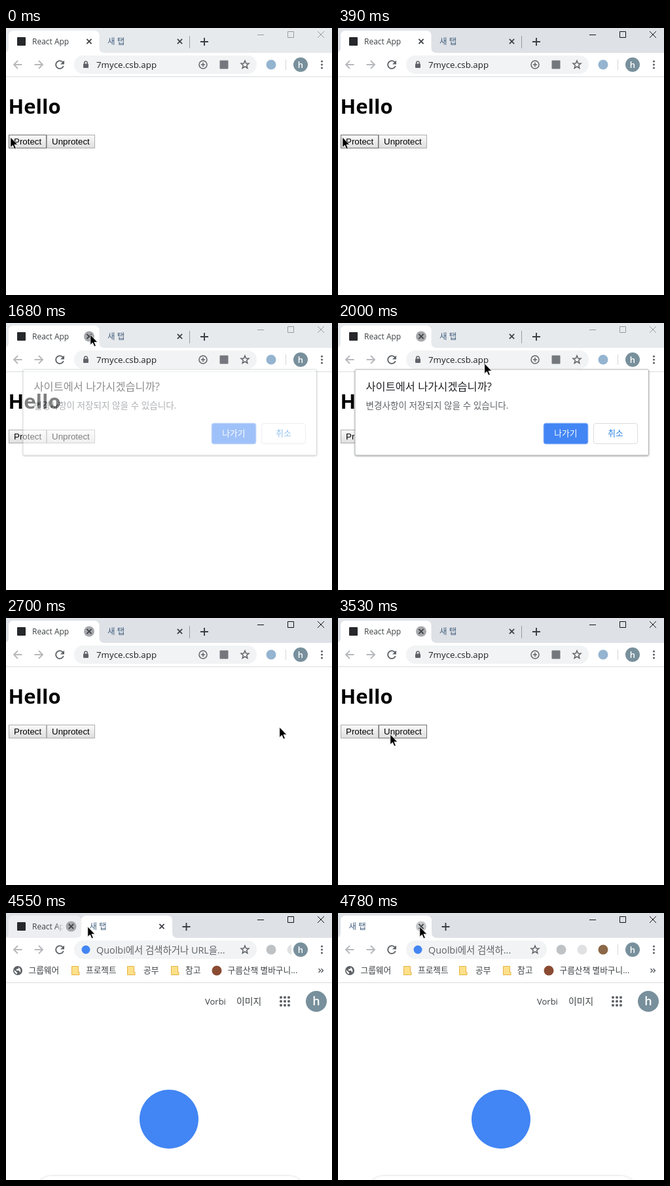
These frames come from a looping animation (498x408 px, 4870 ms). An HTML page:

```html
<!DOCTYPE html>
<html lang="ko">
<head>
<meta charset="utf-8">
<title>Leave-page prompt</title>
<style>
  html, body { margin: 0; width: 100%; height: 100%; overflow: hidden; background: #fff; }
  svg { display: block; width: 100%; height: 100%; }
  text { font-family: 'Open Sans', 'Noto Sans CJK KR', 'Noto Sans CJK', sans-serif; fill: #3c4043; }
  .line { fill: none; stroke: #5f6368; stroke-width: 1.5; }
  .tabTitle { font-size: 12px; }
  .bookmark { font-size: 12.7px; }
  .button rect { fill: url(#face); stroke: #adadad; }
  .button.hover rect { stroke: #707070; }
  .button.pressed rect { fill: #e2e2e2; }
  .button text { font: 13.333px 'Liberation Sans', Arial, sans-serif; fill: #000; }
  .letter { fill: #fff; text-anchor: middle; font-weight: 600; }
</style>
</head>
<body>
<svg viewBox="0 0 498 408">
  <defs>
    <linearGradient id="face" x2="0" y2="1">
      <stop stop-color="#fafafa"/><stop offset="1" stop-color="#dedede"/>
    </linearGradient>
    <linearGradient id="fade">
      <stop offset=".75" stop-color="#fff"/><stop offset="1"/>
    </linearGradient>
    <filter id="shadow" x="-10%" y="-20%" width="120%" height="140%">
      <feDropShadow dx="0" dy="1" stdDeviation="1" flood-opacity=".4"/>
    </filter>
    <filter id="softShadow" x="-10%" y="-30%" width="120%" height="160%">
      <feDropShadow dx="0" dy="1" stdDeviation="2" flood-color="#202124" flood-opacity=".3"/>
    </filter>
    <path id="cross" d="M-3.6-3.6 3.6 3.6M3.6-3.6-3.6 3.6" fill="none" stroke="#3f4246" stroke-width="1.8"/>
    <path id="arrow" d="M24.5 56H12.5M18 50 12 56 18 62" fill="none" stroke="#b6b8bb" stroke-width="1.9"/>
    <path id="star" class="line" d="M0-6 1.7-2 6-1.8 2.7 1 3.8 5.3 0 3-3.8 5.3-2.7 1-6-1.8-1.7-2Z"/>
    <path id="folder" d="M0 0H10V9H11.5V13H0Z" fill="#ffe08a" stroke="#e3b341"/>
    <mask id="titleFade" maskUnits="userSpaceOnUse" x="0" y="0" width="498" height="38">
      <rect id="titleRoom" x="36" y="4" height="34" fill="url(#fade)"/>
    </mask>
    <clipPath id="extensionClip"><rect x="320" y="40" width="116" height="32"/></clipPath>
  </defs>

  <rect width="498" height="408" fill="#fff"/>
  <rect id="titleBar" width="498" height="38"/>

  <g id="firstTab">
    <path id="firstShape"/>
    <rect x="17" y="14" width="13" height="13" rx="1" fill="#26282b"/>
    <text class="tabTitle" x="40" y="25" mask="url(#titleFade)">React App</text>
    <g id="firstClose"><circle id="closeDisc" r="8"/><use href="#cross"/></g>
  </g>
  <path id="divider" d="M280.5 12V31" stroke="#96999e"/>
  <g id="secondTab">
    <path id="secondShape"/>
    <text class="tabTitle" x="12.5" y="25" style="font-size:12.5px;fill:#44607f">새 탭</text>
    <circle id="secondDisc" cx="123" cy="20.5" r="8" fill="#c6c8cb"/>
    <use href="#cross" x="123" y="20.5"/>
    <path d="M154.5 21H166.5M160.5 15V27" stroke="#3a3e42" stroke-width="1.9"/>
  </g>
  <path id="controls" d="M384 10.5H394M430.5 5.5H439.5V14.5H430.5ZM476 5 486 15M486 5 476 15" fill="none"/>

  <rect y="38" width="498" height="36" fill="#fff"/>
  <use href="#arrow"/>
  <use href="#arrow" transform="matrix(-1 0 0 1 68 0)"/>
  <path class="line" d="M87 52.6A6 6 0 1 0 87.8 58" style="stroke-width:1.9"/>
  <path d="M89 49.5V55.5H83Z" fill="#5f6368"/>
  <rect id="pill" x="104" y="42" height="28" rx="14" fill="#f1f3f4"/>
  <use id="pillStar" href="#star" y="56"/>
  <circle cx="450" cy="56" r="11" fill="#78909c"/>
  <text class="letter" x="450" y="60.5" font-size="13">h</text>
  <path d="M482.5 51h0M482.5 56h0M482.5 61h0" stroke="#5f6368" stroke-width="3.2" stroke-linecap="round"/>
  <path id="separator" d="M427.5 48V64" stroke="#d4d6d9"/>

  <g id="appPage">
    <rect x="118" y="54.5" width="8" height="6.5" rx="1" fill="#5f6368"/>
    <path class="line" d="M119.7 55V53.2a2.3 2.3 0 0 1 4.6 0V55"/>
    <text x="138" y="61" font-size="13.3" style="fill:#202124">7myce.csb.app</text>
    <circle class="line" cx="301" cy="56" r="6"/>
    <path class="line" d="M297.8 56H304.2M301 52.8V59.2"/>
    <rect x="326.5" y="49.5" width="13" height="13" rx="1" fill="#74787d"/>
    <circle cx="405" cy="56" r="7.5" fill="#94b4d0"/>
    <path d="M0 74.5H498" stroke="#dadce0"/>
    <text x="3.5" y="131" font-size="31" font-weight="700" style="fill:#000">Hello</text>
    <g class="button" id="protect">
      <rect x="4.5" y="163.5" width="57" height="20"/><text x="12" y="178">Protect</text>
    </g>
    <g class="button" id="unprotect">
      <rect x="62.5" y="163.5" width="73" height="20"/><text x="70" y="178">Unprotect</text>
    </g>
  </g>

  <g id="newTabPage">
    <circle cx="122" cy="56" r="6.5" fill="#4285f4"/>
    <text id="hint" x="138" y="61.5" font-size="14.4" style="fill:#5f6368"></text>
    <g clip-path="url(#extensionClip)">
      <g id="extensions">
        <circle cx="341" cy="56" r="7.5" fill="#bfc2c5"/>
        <circle cx="373" cy="56" r="7.5" fill="#e0e1e3"/>
        <circle cx="405" cy="56" r="7.5" fill="#8b6847"/>
      </g>
    </g>
    <circle cx="18" cy="88" r="7" fill="#5f6368"/>
    <path d="M12.7 87 17 91V93.3A5.6 5.6 0 0 1 12.7 87ZM19 83V85.5H16V88H20L21.5 91A5.6 5.6 0 0 0 19 83Z" fill="#fff"/>
    <use href="#folder" x="100.5" y="81.5"/>
    <use href="#folder" x="185.5" y="81.5"/>
    <use href="#folder" x="252.5" y="81.5"/>
    <circle cx="322" cy="88" r="7.5" fill="#8a4b32"/>
    <g class="bookmark">
      <text x="34.5" y="92">그룹웨어</text>
      <text x="122" y="92">프로젝트</text>
      <text x="210" y="92">공부</text>
      <text x="274" y="92">참고</text>
      <text x="338.5" y="92">구름산책 별바구니...</text>
    </g>
    <path class="line" d="M477.5 85 480.5 88 477.5 91M481.5 85 484.5 88 481.5 91"/>
    <path d="M0 106.5H498" stroke="#dadce0"/>
    <text x="304" y="140" font-size="13">Vorbi</text>
    <text x="352" y="140" font-size="13.8">이미지</text>
    <path d="M420 129H432.1M420 135H432.1M420 141H432.1" stroke="#5f6368" stroke-width="4.2"
      stroke-linecap="round" stroke-dasharray="0 6"/>
    <circle cx="474" cy="135" r="16" fill="#78909c"/>
    <text class="letter" x="474" y="141" font-size="18">h</text>
    <circle cx="249" cy="315" r="45" fill="#4285f4"/>
    <rect x="47" y="402" width="408" height="46" rx="23" fill="#fff" filter="url(#softShadow)"/>
  </g>

  <g id="dialog">
    <rect x="26" y="71" width="448.5" height="131" rx="2" fill="#fff" stroke="#b4b6b8" filter="url(#shadow)"/>
    <text x="42.5" y="103" font-size="16.4" style="fill:#202124">사이트에서 나가시겠습니까?</text>
    <text x="42.5" y="131" font-size="13.6" style="fill:#5f6368">변경사항이 저장되지 않을 수 있습니다.</text>
    <rect x="314" y="153" width="68" height="32" rx="3.5" fill="#4285f4" stroke="#a9c7fa"/>
    <rect x="390.5" y="153.5" width="67" height="31" rx="3.5" fill="#fff" stroke="#dadce0"/>
    <g font-size="12.8" text-anchor="middle">
      <text x="348" y="173" style="fill:#fff">나가기</text>
      <text x="424" y="173" style="fill:#2b83e0">취소</text>
    </g>
  </g>

  <path id="cursor" d="M.8.8V16.5L4.4 13.2 6.9 19 9.4 18 6.9 12.3H11.8Z" stroke="#fff" stroke-width=".8"/>
</svg>
<script>
const LOOP = 4870;
const HINT = 'Quolbi에서 검색하거나 URL을';
const $ = id => document.getElementById(id);

// Every list starts with a time in ms; a value holds until the next entry.
const cursorPath = [
  [0, 6, 166], [850, 12, 158], [920, 38, 128], [1000, 78, 82], [1070, 113, 42],
  [1150, 132, 18], [1220, 134, 12], [1300, 131, 15], [1370, 128, 17],
  [2000, 223, 61], [2080, 300, 101], [2150, 366, 137], [2230, 402, 157], [2300, 414, 164],
  [2380, 417, 166], [2780, 394, 163], [2850, 298, 155], [2930, 190, 149], [3010, 122, 151],
  [3080, 106, 160], [3150, 92, 167], [3230, 83, 172], [3300, 80, 174], [3470, 79, 176],
  [3530, 79, 177], [3780, 82, 169], [3850, 92, 142], [3930, 112, 98], [4010, 136, 48],
  [4090, 150, 14], [4160, 137, 16], [4240, 124, 21], [4310, 124, 20]
];
// time, left edge of the second tab, right edge of the address field
const tabSlide = [
  [0, 142.5, 383], [4480, 132, 383], [4550, 115, 383],
  [4650, 58, 351], [4700, 24, 332], [4780, 4, 319]
];
const dialogFade = [[0, 0], [1610, .5], [1690, 1], [2630, .4], [2700, 0]];

const hold = (list, t) => list.findLast(step => step[0] <= t).slice(1);
const within = (t, from, to) => t >= from && t < to;
const show = (id, on) => $(id).style.display = on ? '' : 'none';
const place = (id, x, y = 0) => $(id).setAttribute('transform', `translate(${x} ${y})`);
const set = (id, name, value) => $(id).setAttribute(name, value);

function tabShape(left, right) {
  return `M${left - 8} 38Q${left} 38 ${left} 30V12Q${left} 4 ${left + 8} 4` +
    `H${right - 8}Q${right} 4 ${right} 12V30Q${right} 38 ${right + 8} 38Z`;
}

function drawTabs(t, x, y) {
  const [left, pillRight] = hold(tabSlide, t);
  const closing = t >= 4480;
  const secondHover = !closing && y < 38 && x > 143 && x < 281;

  show('firstTab', left > 40);
  set('firstShape', 'd', tabShape(4, Math.max(left, 24)));
  set('firstShape', 'fill', closing ? '#eceef1' : '#fff');
  set('titleRoom', 'width', Math.max(0, left - 63));
  place('firstClose', left - 15.5, 20.5);
  show('closeDisc', t >= 1300);
  set('closeDisc', 'fill', within(t, 1300, 1460) ? '#dadce0' : '#a6a8ab');

  place('secondTab', left);
  set('secondShape', 'd', tabShape(0, 139));
  set('secondShape', 'fill', closing ? '#fff' : secondHover ? '#eceef1' : 'none');
  show('secondDisc', t >= 4780);
  show('divider', !closing && !secondHover);

  set('pill', 'width', pillRight - 104);
  set('pillStar', 'x', pillRight - 18);
  place('extensions', pillRight - 319);
  show('separator', !closing || t >= 4780);
  const hidden = Math.round((383 - pillRight) / 64 * 7);
  $('hint').textContent = HINT.slice(0, HINT.length - hidden) + '...';
}

function drawButton(id, hover, pressed) {
  $(id).classList.toggle('hover', hover);
  $(id).classList.toggle('pressed', pressed);
}

function render(t) {
  const [x, y] = hold(cursorPath, t);
  const active = within(t, 80, 1540) || t >= 2630;
  set('titleBar', 'fill', active ? '#dee1e6' : '#e7eaed');
  set('controls', 'stroke', active ? '#111' : '#999');

  drawTabs(t, x, y);
  show('appPage', t < 4480);
  show('newTabPage', t >= 4480);
  const overButton = y >= 163 && y < 184;
  drawButton('protect', overButton && x < 62, within(t, 80, 310));
  drawButton('unprotect', overButton && x >= 62 && x < 136, within(t, 3470, 3530));

  const [opacity] = hold(dialogFade, t);
  show('dialog', opacity > 0);
  $('dialog').style.opacity = opacity;
  place('cursor', x, y);
}

const start = performance.now();
function tick() {
  render((performance.now() - start) % LOOP);
  requestAnimationFrame(tick);
}
tick();
</script>
</body>
</html>
```
